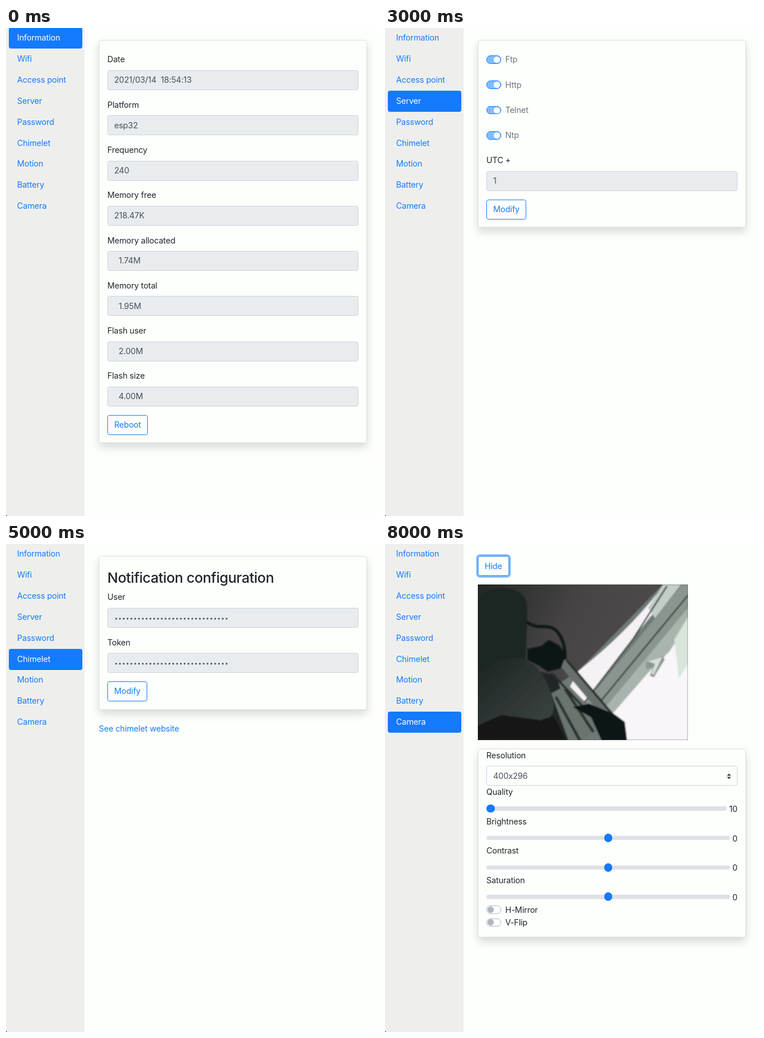
Write an HTML page that moves like this. It is 655 px wide and 856 px high and loops after 9000 ms.

```html
<!DOCTYPE html>
<html lang="en">
<head>
<meta charset="utf-8">
<title>Device settings</title>
<style>
  :root { --blue: #147afe; --paper: #fdfffd; --line: #ced4da; }
  * { box-sizing: border-box; }
  html, body { margin: 0; width: 100%; height: 100%; overflow: hidden; }
  body {
    position: relative;
    background: var(--paper);
    color: #212529;
    font: 14.3px/22.12px Inter, "Open Sans", sans-serif;
    font-optical-sizing: none;
    letter-spacing: -.14px;
  }
  nav { position: absolute; left: 0; top: 0; width: 138px; height: 100%; background: #eeefed; }
  nav::after {
    content: ""; position: absolute; left: 0; bottom: 0; width: 3px; height: 3px;
    background: radial-gradient(circle at 100% 0, transparent 2.6px, #444 3px);
  }
  .tab {
    position: absolute; left: 5px; width: 129px; height: 37px; padding: 7.4px 14.5px;
    border-radius: 3.7px; color: var(--blue);
  }
  .page { position: absolute; inset: 0; visibility: hidden;
    animation: show 9s step-end calc(var(--i) * 1s - 9s) infinite; }
  .page > .tab { background: var(--blue); color: #fff; }
  @keyframes show {
    0% { visibility: visible; }
    11.1111%, 100% { visibility: hidden; }
  }
  .main { position: absolute; left: 163px; top: 21.3px; width: 471px; }
  .card {
    padding: 22.2px 14px 13.75px; border: 1px solid #dcdedd; border-radius: 3.7px;
    background: var(--paper); box-shadow: 0 7.4px 14.75px rgba(0, 0, 0, .15);
  }
  h3 { margin: 0 0 7px; font-size: 24.8px; line-height: 31px; font-weight: 500; letter-spacing: -.38px; }
  .box {
    position: relative; height: 35px; margin: 7.4px 0 14.75px; padding: 5.4px 11px;
    border: 1px solid var(--line); border-radius: 3.7px;
    background: #e8ecef; color: #495057; white-space: pre;
  }
  .gap { margin-bottom: 22.12px; }
  .dots {
    position: absolute; left: 11px; top: 13.5px; height: 8px; width: calc(var(--n) * 6.7px);
    background: radial-gradient(circle at 3.35px 4px, #495057 1.2px, transparent 1.9px) 0 0 / 6.7px 8px;
  }
  .switch { position: relative; padding-left: 33.2px; margin-bottom: 22.12px; color: #6c757d; }
  .switch i {
    position: absolute; left: 0; top: 3.7px; width: 25.8px; height: 14.75px;
    border: 1px solid #adb5bd; border-radius: 7.4px; background: #e9ecef;
  }
  .switch i::after {
    content: ""; position: absolute; left: .9px; top: .9px; width: 11px; height: 11px;
    border-radius: 50%; background: #adb5bd;
  }
  .switch.on i { background: #80bdff; border-color: var(--blue); }
  .switch.on i::after { left: 12px; background: #fff; }
  .switch.live { margin: 0; color: inherit; }
  .switch.live i { background: var(--paper); }
  .button {
    display: inline-block; height: 35px; padding: 5.4px 11px; vertical-align: top;
    border: 1px solid var(--blue); border-radius: 3.7px; background: var(--paper); color: var(--blue);
  }
  .focus { box-shadow: 0 0 0 2.95px rgba(20, 122, 254, .5); }
  .link { margin-top: 22.12px; color: var(--blue); }
  .photo { display: block; width: 369px; height: 273px; margin: 14.7px 0; }
  .camera { padding-top: 0; }
  .camera .box { margin-bottom: 0; background: var(--paper); }
  .box svg { position: absolute; right: 10.5px; top: 11.5px; }
  .slider { display: flex; height: 29.5px; padding-top: 7.7px; }
  .slider b {
    position: relative; flex: 1; height: 7.4px; margin: 6.3px 4px 0 0;
    border-radius: 3.7px; background: #dee1e5;
  }
  .slider b::after {
    content: ""; position: absolute; left: calc(var(--v) * (100% - 14.75px)); top: -3.7px;
    width: 14.75px; height: 14.75px; border-radius: 50%; background: var(--blue);
  }
</style>
</head>
<body>
<nav></nav>
<template id="photo">
  <svg class="photo" viewBox="163 71 369 273">
    <defs>
      <linearGradient id="wall" x1="0" x2="1" y2=".4">
        <stop offset="0" stop-color="#232726"/><stop offset=".45" stop-color="#474446"/><stop offset="1" stop-color="#514d4f"/>
      </linearGradient>
      <linearGradient id="shade" x2="1" y2="1">
        <stop offset="0" stop-color="#1d2422"/><stop offset="1" stop-color="#3d4442"/>
      </linearGradient>
      <filter id="soft" x="0" y="0" width="1" height="1"><feGaussianBlur stdDeviation=".9"/></filter>
    </defs>
    <path fill="url(#wall)" d="M163 71H532V344H163Z"/>
    <g filter="url(#soft)">
      <path fill="#6f7974" d="M488 71H532V344H300L290 255L340 222Z"/>
      <path fill="#f5f2f6" d="M482 82L506 78L440 160L352 278L325 250L340 222Q420 160 482 82Z"/>
      <path fill="#c3cec7" d="M488 71H520L474 130L462 112Z"/>
      <path fill="#8a958f" d="M532 71V112L384 290L352 278L440 172L522 71Z"/>
      <path fill="none" stroke="#343c38" stroke-width="2.5" d="M495 74L436 166L350 278M532 90L372 284"/>
      <path fill="#a9b4ad" d="M532 112V160L420 310L384 290Z"/>
      <path fill="#f9f6fa" d="M532 138V344H424L396 302L462 226L500 188Z"/>
      <path fill="#d8e5da" d="M532 128V210L516 236L508 168Z"/>
      <path fill="#8c9690" d="M458 208L488 196L491 203L472 234L465 231L471 216L459 220Z"/>
      <path fill="#d9dfda" d="M462 206L487 198L472 229L468 228L474 210Z"/>
      <path fill="#202725" d="M163 200L300 230L340 344H163Z"/>
      <path fill="#6b756f" d="M292 262L318 248L372 318L350 344H322Z"/>
      <path fill="none" stroke="#2b322f" stroke-width="5" d="M300 268L342 344M316 254L366 330"/>
      <path fill="#1e2523" d="M163 98Q175 77 212 78Q249 81 250 112L247 205L163 222Z"/>
      <path fill="url(#shade)" d="M163 232Q205 190 246 202Q282 218 296 280Q299 308 272 309L205 300L163 318Z"/>
      <path fill="#131917" d="M163 318L205 300L272 309L296 302L318 344H163Z"/>
      <path fill="none" stroke="#101412" stroke-width="5" d="M249 137C270 152 282 138 300 151Q318 170 316 204"/>
      <path fill="none" stroke="#69706c" stroke-width="14" d="M311 207L396 308"/>
      <path fill="none" stroke="#272e2b" stroke-width="4" d="M319 204L404 304M292 226L352 290"/>
      <path fill="#111614" d="M250 184L274 179L288 168L306 178L318 194L309 218L286 224L268 212L250 203ZM330 286L358 280L402 298L421 312L425 344H380L362 304Z"/>
    </g>
  </svg>
</template>
<script>
  const tabs = ["Information", "Wifi", "Access point", "Server", "Password", "Chimelet", "Motion", "Battery", "Camera"];
  const pitch = 36.88;

  const tab = i => `<div class="tab" style="top:${Math.round(i * pitch - .9)}px">${tabs[i]}</div>`;
  const card = (...rows) => `<div class="card">${rows.join("")}</div>`;
  const field = (label, value, extra = "") => `<div>${label}</div><div class="box ${extra}">${value}</div>`;
  const fields = list => list.map(row => field(...row)).join("");
  const dots = n => `<span class="dots" style="--n:${n}"></span>`;
  const toggle = (label, state = "") => `<div class="switch ${state}"><i></i>${label}</div>`;
  const button = (label, state = "") => `<div class="button ${state}">${label}</div>`;
  const title = text => `<h3>${text}</h3>`;
  const slider = (label, value, part) =>
    `<div>${label}</div><div class="slider"><b style="--v:${part}"></b>${value}</div>`;
  const modify = button("Modify");
  const arrows = `<svg width="8" height="11" fill="#343a40"><path d="M4 .8L7.6 4.6H.4ZM4 10.2L.4 6.4H7.6Z"/></svg>`;

  const pages = [
    card(fields([
      ["Date", "2021/03/14  18:54:13"], ["Platform", "esp32"], ["Frequency", "240"],
      ["Memory free", "218.47K"], ["Memory allocated", "  1.74M"], ["Memory total", "  1.95M"],
      ["Flash user", "  2.00M"], ["Flash size", "  4.00M"]
    ]), button("Reboot")),

    card(toggle("Activated", "on"), fields([
      ["SSID", "BoxJardin42", "gap"], ["Password", dots(26)], ["Ip address", "192.168.1.132"],
      ["Netmask", "255.255.255.0"], ["Gateway", "192.168.1.1"], ["DNS", "192.168.1.1"]
    ]), modify),

    card(toggle("Activated"), fields([
      ["SSID", "esp32", "gap"], ["Password", dots(10)], ["Authentication", "WPA2-PSK"],
      ["Ip address", "192.168.3.1"], ["Netmask", "255.255.255.0"],
      ["Gateway", "192.168.3.1"], ["DNS", "192.168.3.1"]
    ]), modify),

    card(["Ftp", "Http", "Telnet", "Ntp"].map(name => toggle(name, "on")).join(""),
      field("UTC +", "1"), modify),

    card(fields([["User", ""], ["Password", ""], ["Renew password", ""]]), modify),

    card(title("Notification configuration"), fields([["User", dots(30)], ["Token", dots(30)]]), modify)
      + `<div class="link">See chimelet website</div>`,

    card(toggle("Activated"), title("Images configuration"), fields([
      ["Start detection at image", "6"], ["Image historic size", "10"],
      ["Glitch ignored threshold", "2"], ["Motion detection threshold", "3"]
    ]), title("Detection configuration"), fields([
      ["Minimum difference threshold", "5"], ["Maximum difference threshold", "130"],
      ["Equivalence range", "15"], ["Awake duration on battery", "15"]
    ]), modify),

    card(toggle("Activated"), fields([
      ["GPIO on ADC", "12"], ["Full battery mV", "2760"], ["Empty battery mV", "2205"]
    ]), toggle("Brownout detection"), modify),

    button("Hide", "focus") + document.getElementById("photo").innerHTML
      + `<div class="card camera">${field("Resolution", "400x296" + arrows)}`
      + slider("Quality", 10, 0)
      + ["Brightness", "Contrast", "Saturation"].map(name => slider(name, 0, .5)).join("")
      + toggle("H-Mirror", "live") + toggle("V-Flip", "live") + "</div>"
  ];

  document.querySelector("nav").innerHTML = tabs.map((_, i) => tab(i)).join("");
  document.body.insertAdjacentHTML("beforeend", pages.map((content, i) =>
    `<section class="page" style="--i:${i}">${tab(i)}<div class="main">${content}</div></section>`).join(""));
</script>
</body>
</html>
```
